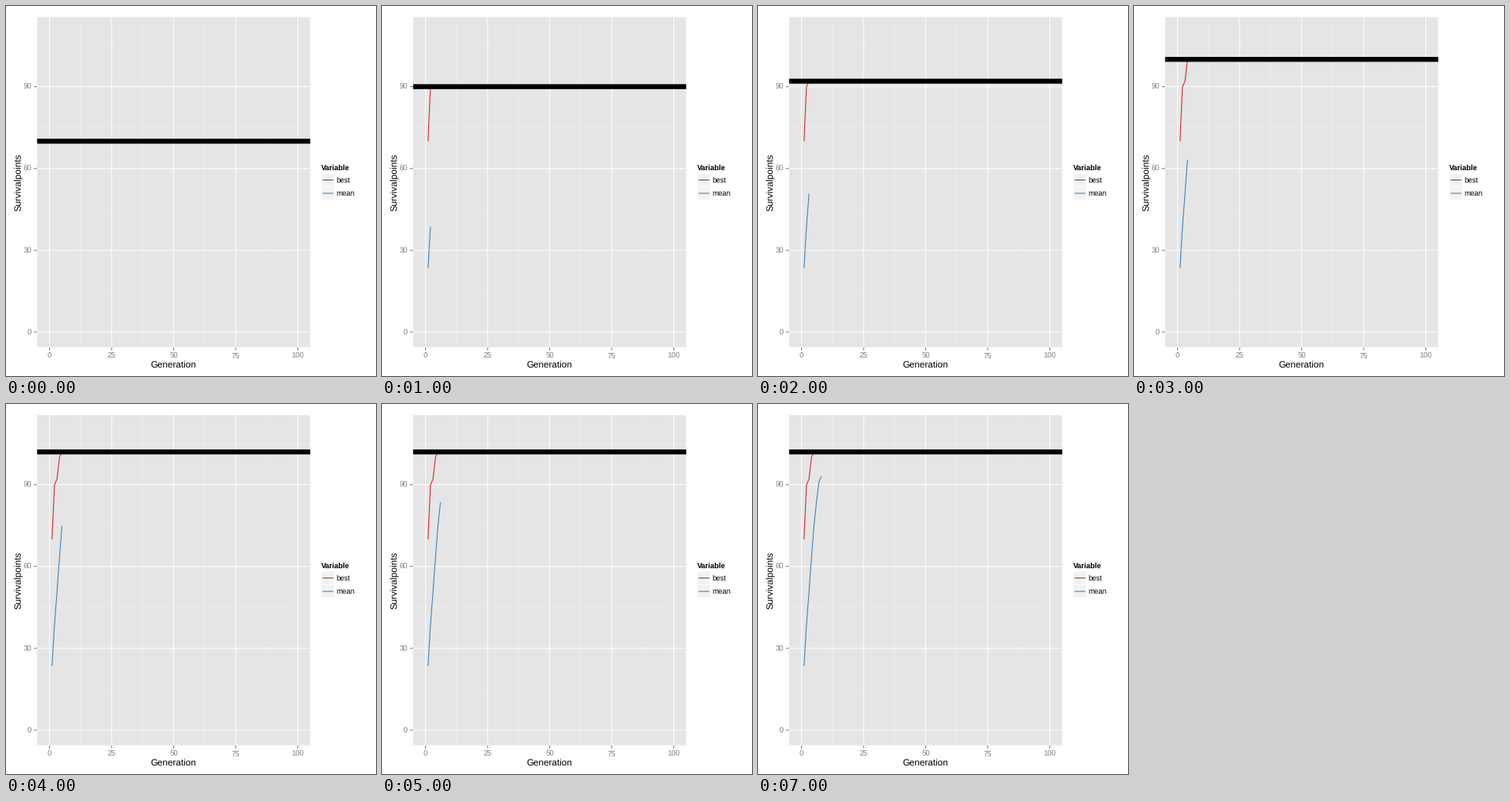
A matplotlib script for the animation above (8 s loop, 480x480 px).

```python
import matplotlib.pyplot as plt
from matplotlib.animation import FuncAnimation
from matplotlib.patches import Rectangle

plt.rcParams["font.family"] = "Liberation Sans"
plt.rcParams["text.hinting"] = "none"

SIZE = 480
GREY = "#7f7f7f"
RED, BLUE = "#e41a1c", "#377eb8"
LEFT, RIGHT, TOP, BOTTOM = 40.4, 394.6, 14.4, 442.6
THIN = 1.07

best = [70, 90, 92, 100, 102, 102, 102, 102]
mean = [23.5, 38.7, 50.8, 63.2, 74.9, 83.6, 90.9, 93.1]

# At 72 dpi one point is one pixel.
fig = plt.figure(figsize=(SIZE / 72, SIZE / 72), dpi=72, facecolor="white")
ax = fig.add_axes([0, 0, 1, 1])
ax.set_xlim(0, SIZE)
ax.set_ylim(SIZE, 0)
ax.axis("off")


def px(gen):
    return 56.5 + 3.22 * gen


def py(points):
    return 423.12 - 3.539 * points


def line(xs, ys, color, width=THIN, z=2):
    return ax.plot(xs, ys, color=color, lw=width, zorder=z, snap=False,
                   solid_capstyle="butt", solid_joinstyle="round")[0]


def box(x, y, w, h, **style):
    ax.add_patch(Rectangle((x, y), w, h, snap=False, **style))


def label(x, y, text, size=9.6, color="black", **style):
    ax.text(x, y, text, fontsize=size, color=color, va="baseline", **style)


# Panel and grid
box(LEFT, TOP, RIGHT - LEFT, BOTTOM - TOP, fc="#e5e5e5", lw=0)
for gen in (12.5, 37.5, 62.5, 87.5):
    line([px(gen)] * 2, [TOP, BOTTOM], "#f2f2f2", 0.53)
for pts in (15, 45, 75, 105):
    line([LEFT, RIGHT], [py(pts)] * 2, "#f2f2f2", 0.53)
for gen in (0, 25, 50, 75, 100):
    line([px(gen)] * 2, [TOP, BOTTOM], "white", z=3)
    line([px(gen)] * 2, [BOTTOM, BOTTOM + 4.2], GREY)
    label(px(gen), 457, str(gen), color=GREY, ha="center")
for pts in (0, 30, 60, 90):
    line([LEFT, RIGHT], [py(pts)] * 2, "white", z=3)
    line([LEFT - 4.2, LEFT], [py(pts)] * 2, GREY)
    label(33.3, py(pts) + 3.5, str(pts), color=GREY, ha="right")

label(217.5, 469, "Generation", 12, ha="center")
ax.text(20, 228.5, "Survivalpoints", fontsize=12, rotation=90,
        ha="right", va="center", rotation_mode="default").set_position((22.6, 228.5))

# Legend
label(409, 213, "Variable", weight="bold")
for name, top, color in (("best", 217.1, "#5f4444"), ("mean", 234.4, BLUE)):
    box(409, top, 17.28, 17.28, fc="#f2f2f2", ec="white", lw=THIN)
    line([410.7, 424.6], [top + 8.6] * 2, color, z=4)
    label(428, top + 12, name)

# Data
best_line = line([], [], RED, z=5)
mean_line = line([], [], BLUE, z=5)
record = line([], [], "black", 6.4, z=6)


def draw(i):
    xs = [px(g + 1) for g in range(i + 1)]
    best_line.set_data(xs, [py(v) for v in best[:i + 1]])
    mean_line.set_data(xs, [py(v) for v in mean[:i + 1]])
    record.set_data([LEFT, RIGHT], [py(best[i])] * 2)
    return best_line, mean_line, record


anim = FuncAnimation(fig, draw, frames=8, interval=1000, repeat=True, repeat_delay=0)
plt.show()
```
